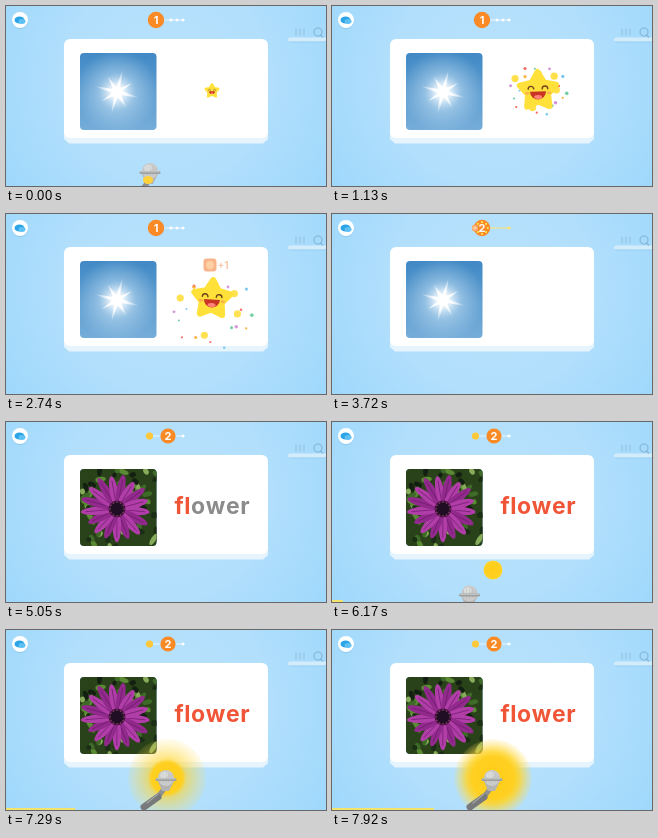
Recreate the animation shown at these times as an HTML page with a canvas. Size 320 by 180 pixels, loop 7990 ms.

```html
<!DOCTYPE html>
<html lang="en">
<head>
<meta charset="utf-8">
<title>Word card</title>
<style>
  html, body { margin: 0; width: 100%; height: 100%; overflow: hidden; background: #a3d9fc; }
  canvas { display: block; width: 320px; height: 180px; }
</style>
</head>
<body>
<canvas id="stage"></canvas>
<script>
const LOOP = 7990, STEP = 70, TAU = Math.PI * 2;
const canvas = document.getElementById('stage');
const ctx = canvas.getContext('2d');
const density = window.devicePixelRatio || 1;
canvas.width = 320 * density;
canvas.height = 180 * density;

const ramp = (t, from, to) => Math.min(1, Math.max(0, (t - from) / (to - from)));
const mix = (a, b, k) => a + (b - a) * k;
const easeOut = k => 1 - (1 - k) ** 3;
const easeInOut = k => k * k * (3 - 2 * k);
const overshoot = k => 1 + 2.4 * (k - 1) ** 3 + 1.4 * (k - 1) ** 2;
const random = n => { const v = Math.sin(n * 127.1 + 11.7) * 43758.5453; return v - Math.floor(v); };

function dot(x, y, r, fill) {
  ctx.fillStyle = fill;
  ctx.beginPath();
  ctx.arc(x, y, Math.max(0, r), 0, TAU);
  ctx.fill();
}
function oval(x, y, rx, ry, angle, fill) {
  ctx.fillStyle = fill;
  ctx.beginPath();
  ctx.ellipse(x, y, rx, ry, angle, 0, TAU);
  ctx.fill();
}
function box(x, y, w, h, r, fill) {
  ctx.fillStyle = fill;
  ctx.beginPath();
  ctx.roundRect(x, y, w, h, r);
  ctx.fill();
}
function line(x1, y1, x2, y2, width, color) {
  ctx.strokeStyle = color;
  ctx.lineWidth = width;
  ctx.lineCap = 'round';
  ctx.beginPath();
  ctx.moveTo(x1, y1);
  ctx.lineTo(x2, y2);
  ctx.stroke();
}
function shape(points, fill) {
  ctx.fillStyle = fill;
  ctx.beginPath();
  points.forEach(([x, y]) => ctx.lineTo(x, y));
  ctx.closePath();
  ctx.fill();
}
function radial(x, y, r, ...stops) {
  const g = ctx.createRadialGradient(x, y, 0, x, y, r);
  stops.forEach(([at, color]) => g.addColorStop(at, color));
  return g;
}
function label(text, x, y, size, color, align = 'center') {
  ctx.font = `700 ${size}px Inter, sans-serif`;
  ctx.textAlign = align;
  ctx.fillStyle = color;
  ctx.fillText(text, x, y);
}
function scoped(alpha, draw) {
  ctx.save();
  ctx.globalAlpha *= alpha;
  draw();
  ctx.restore();
}

function background() {
  ctx.fillStyle = radial(160, 75, 190, [0, '#b9e2fc'], [0.55, '#b1dffc'], [1, '#9fd8fc']);
  ctx.fillRect(0, 0, 320, 180);

  // Shelf with books and a magnifier
  box(282, 31.5, 40, 4, 2, '#d3ecfb');
  line(284, 36, 320, 36, 0.6, '#91c6e9');
  for (let i = 0; i < 3; i++) line(290 + i * 4, 23, 290 + i * 4, 29, 1, '#92bedc');
  ctx.strokeStyle = '#83b4d7';
  ctx.lineWidth = 1.1;
  ctx.beginPath();
  ctx.arc(312, 26, 4, 0, TAU);
  ctx.stroke();
  line(314.5, 28.8, 316.5, 31, 1.2, '#83b4d7');

  // Back button
  dot(14, 15, 8.2, '#8fcbf0');
  dot(14, 14, 8, '#fff');
  oval(13.5, 14, 5, 3.6, 0, '#2ba3e7');
  oval(16, 15.5, 3.5, 2.4, 0, '#5fc0f2');
}

function progress(t) {
  const move = easeInOut(ramp(t, 3720, 4070));
  const second = t >= 3650;
  const x = mix(150, 162, move);
  const flash = second && t < 4000;
  line(second ? 144 : 152, 14, 178, 14, 1, flash ? '#ffe36a' : '#e9f6fd');
  for (const px of second ? [177] : [165, 171, 177]) dot(px, 14, 1.5, flash ? '#ffe36a' : '#fff');
  if (second) dot(143.5, 14, 3.6, '#ffc83b');
  dot(x, 14, mix(8.2, 7.6, move), '#f98a25');
  label(second ? '2' : '1', x, 18, 11, '#fff');
  if (flash) {
    for (let i = 0; i < 8; i++) {
      const a = i * TAU / 8, r = 4 + 6 * ramp(t, 3600, 4000);
      dot(150 + r * Math.cos(a), 14 + r * Math.sin(a), 1.1, '#ffe15a');
    }
  }
}

function card() {
  shape([[58, 126], [262, 126], [262, 133], [257, 137.5], [63, 137.5], [58, 133]], '#e6f4fd');
  box(58, 33, 204, 99, 6, '#fff');
}

function sunPhoto() {
  const sky = ctx.createLinearGradient(0, 47, 0, 124);
  sky.addColorStop(0, '#4189c5');
  sky.addColorStop(1, '#75add9');
  ctx.fillStyle = sky;
  ctx.fillRect(74, 47, 77, 77);
  ctx.fillStyle = radial(111, 86, 42, [0, '#fff'], [0.18, '#f4faffdd'], [0.45, '#c3e0f480'], [1, '#b7d8ee00']);
  ctx.fillRect(74, 47, 77, 77);
  const glare = radial(111, 86, 24, [0, '#fff'], [0.4, '#fffd'], [1, '#fff0']);
  for (let i = 0; i < 8; i++) {
    const a = i * TAU / 8 + 0.25, r = i % 2 ? 18 : 24;
    const at = (angle, d) => [111 + d * Math.cos(angle), 86 + d * Math.sin(angle)];
    shape([at(a - 0.4, 5), at(a, r), at(a + 0.4, 5)], glare);
  }
  dot(111, 86, 6, '#fff');
}

function flowerPhoto() {
  ctx.fillStyle = '#2a4219';
  ctx.fillRect(74, 47, 77, 77);
  for (let i = 0; i < 70; i++) {
    const tone = ['#5b8a35', '#131f10', '#86ab5a', '#3f6b28', '#1c2d15'][i % 5];
    oval(74 + 77 * random(i), 47 + 77 * random(i + 60), 2 + 5 * random(i + 120), 2.5, 3 * random(i + 9), tone);
  }
  const count = 17;
  for (let i = 0; i < count; i++) {
    const a = i * TAU / count + 0.1, length = 29 + 6 * random(i + 40);
    ctx.save();
    ctx.translate(111, 87);
    ctx.rotate(a);
    oval(length / 2 + 2, 0, length / 2, 4.2, 0, i % 2 ? '#92298c' : '#b13ea8');
    line(9, 0, length - 3, 0, 0.7, '#6d1c6c');
    ctx.restore();
  }
  dot(111, 87, 8.5, '#45133f');
  dot(111, 87, 6.5, '#200e25');
  for (let i = 0; i < 12; i++) {
    const a = i * TAU / 12;
    dot(111 + 7 * Math.cos(a), 87 + 7 * Math.sin(a), 0.7, '#8c4a60');
  }
}

function photo(t) {
  ctx.save();
  ctx.beginPath();
  ctx.roundRect(74, 47, 76.5, 77, 4);
  ctx.clip();
  sunPhoto();
  scoped(ramp(t, 3930, 4210), flowerPhoto);
  ctx.restore();
}

function word(t) {
  const spoken = t < 4830 ? 0 : t < 5200 ? 2 : t < 5500 ? 4 : 6;
  scoped(ramp(t, 4000, 4280), () => {
    ctx.letterSpacing = '0.6px';
    let x = 168.5;
    [...'flower'].forEach((letter, i) => {
      label(letter, x, 91.5, 23, i < spoken ? '#ef5536' : '#8b8b8b', 'left');
      x += ctx.measureText(letter).width;
    });
  });
}

function star(t) {
  const size = mix(0.36, 1, overshoot(ramp(t, 70, 750))) * (1 - easeInOut(ramp(t, 3100, 3500)));
  if (size <= 0) return;
  ctx.save();
  ctx.translate(206, 85);
  ctx.scale(size, size);
  ctx.rotate(0.07 * Math.sin(t / 190) * ramp(t, 700, 1000));
  ctx.beginPath();
  for (let i = 0; i < 10; i++) {
    const a = i * TAU / 10 - TAU / 4, r = i % 2 ? 10.5 : 19;
    ctx.lineTo(r * Math.cos(a), r * Math.sin(a));
  }
  ctx.closePath();
  ctx.fillStyle = ctx.strokeStyle = '#ffe13a';
  ctx.lineJoin = 'round';
  ctx.lineWidth = 6;
  ctx.stroke();
  ctx.fill();
  ctx.strokeStyle = '#72451e';
  ctx.lineWidth = 1.4;
  for (const side of [-1, 1]) {
    ctx.beginPath();
    ctx.arc(side * 7, -2, 2.8, Math.PI, TAU);
    ctx.stroke();
    oval(side * 11, 2, 2.2, 1.5, 0, '#ffb34f');
  }
  ctx.fillStyle = '#c93425';
  ctx.beginPath();
  ctx.arc(0, 0.5, 8, 0, Math.PI);
  ctx.fill();
  oval(0, 6, 4, 2, 0, '#ff8178');
  ctx.restore();
}

function confetti(t) {
  if (t < 800 || t > 3450) return;
  const colors = ['#ffe04a', '#f36b62', '#ffb13b', '#70cfa0', '#d694d8', '#79c7ef'];
  const spread = easeOut(ramp(t, 800, 1750));
  const fall = ramp(t, 1900, 3450) ** 2 * 45;
  scoped(1 - ramp(t, 2700, 3450), () => {
    for (let i = 0; i < 22; i++) {
      const a = i * 2.4, r = (24 + 17 * random(i + 3)) * spread;
      const size = i % 6 ? 0.8 + random(i + 8) : 3.6;
      dot(206 + r * Math.cos(a), 84 + r * 0.86 * Math.sin(a) + fall * (0.5 + random(i)), size, colors[i % 6]);
    }
  });
}

function reward(t) {
  if (t < 1400 || t > 3720) return;
  const appear = easeOut(ramp(t, 1400, 1800)), fly = easeInOut(ramp(t, 3370, 3720));
  const size = mix(13, 6, fly);
  const x = mix(204, 143, fly), y = mix(mix(62, 51, appear), 14, fly);
  scoped(appear * 0.85, () => {
    box(x - size / 2, y - size / 2, size, size, size / 4, '#f7a878');
    dot(x, y, size * 0.3, '#ffd5a8');
    if (!fly) label('+1', 217, 55, 10, '#f8bea0');
  });
}

function microphone(x, y) {
  ctx.save();
  ctx.translate(x, y);
  line(-2, 11, -9, 20, 5, '#8f9090');
  line(-8, 19, -22, 29, 7, '#77797b');
  line(-8, 16, -19, 25, 1.2, '#a3a5a6');
  shape([[-8, 3], [8, 3], [3, 13], [-4, 13]], '#b3b4b2');
  dot(0, 0, 8, '#c9cac9');
  oval(-2, -3, 4, 3, -0.4, '#dddfdf');
  for (let i = -2; i <= 2; i++) line(i * 3, -5 + Math.abs(i), i * 3, 4, 0.4, '#b0b2b2');
  box(-10.5, 0, 21, 3, 1.5, '#9da0a1');
  line(-9, 0.8, 9, 0.8, 0.7, '#e1e3e3');
  ctx.restore();
}

function glow(t) {
  const r = 39 * ramp(t, 5960, 6820);
  if (!r) return;
  const pulse = 0.5 + 0.5 * Math.cos((t - 7920) * TAU / 1260);
  const soft = ramp(t, 6200, 6820);
  const core = mix(0.98, mix(0.5, 0.68, pulse), soft);
  const middle = mix(1, mix(0.6, 0.85, pulse), soft);
  dot(161, 148, r, radial(161, 148, r,
    [0, '#ffcd17'],
    [core * 0.8, '#ffd021'],
    [core, `rgba(255, 213, 45, ${middle})`],
    [1, `rgba(255, 222, 90, ${1 - 0.9 * soft})`]));
}

function timer(t) {
  if (t < 5960) return;
  ctx.fillStyle = '#f3e36a';
  ctx.fillRect(0, 178, (t - 5960) * 0.052, 2);
}

function recorder(t) {
  if (t < 420) {
    const leave = ramp(t, 0, 400);
    const x = 144 - 22 * leave, y = 165 + 30 * leave;
    microphone(x, y);
    oval(x - 2, y + 9, 5, 4, 0, '#ffd23b');
  }
  glow(t);
  timer(t);
  if (t > 5960) {
    const rise = ramp(t, 5960, 6380);
    microphone(mix(115, 160, rise), mix(195, 148, rise));
  }
}

function frame(now) {
  const clock = now % LOOP;
  const t = Math.max(0, Math.floor((clock - 10) / STEP) * STEP + 10);
  ctx.setTransform(density, 0, 0, density, 0, 0);
  background();
  progress(t);
  card();
  photo(t);
  word(t);
  confetti(t);
  star(t);
  reward(t);
  recorder(t);
  requestAnimationFrame(frame);
}
requestAnimationFrame(frame);
</script>
</body>
</html>
```
